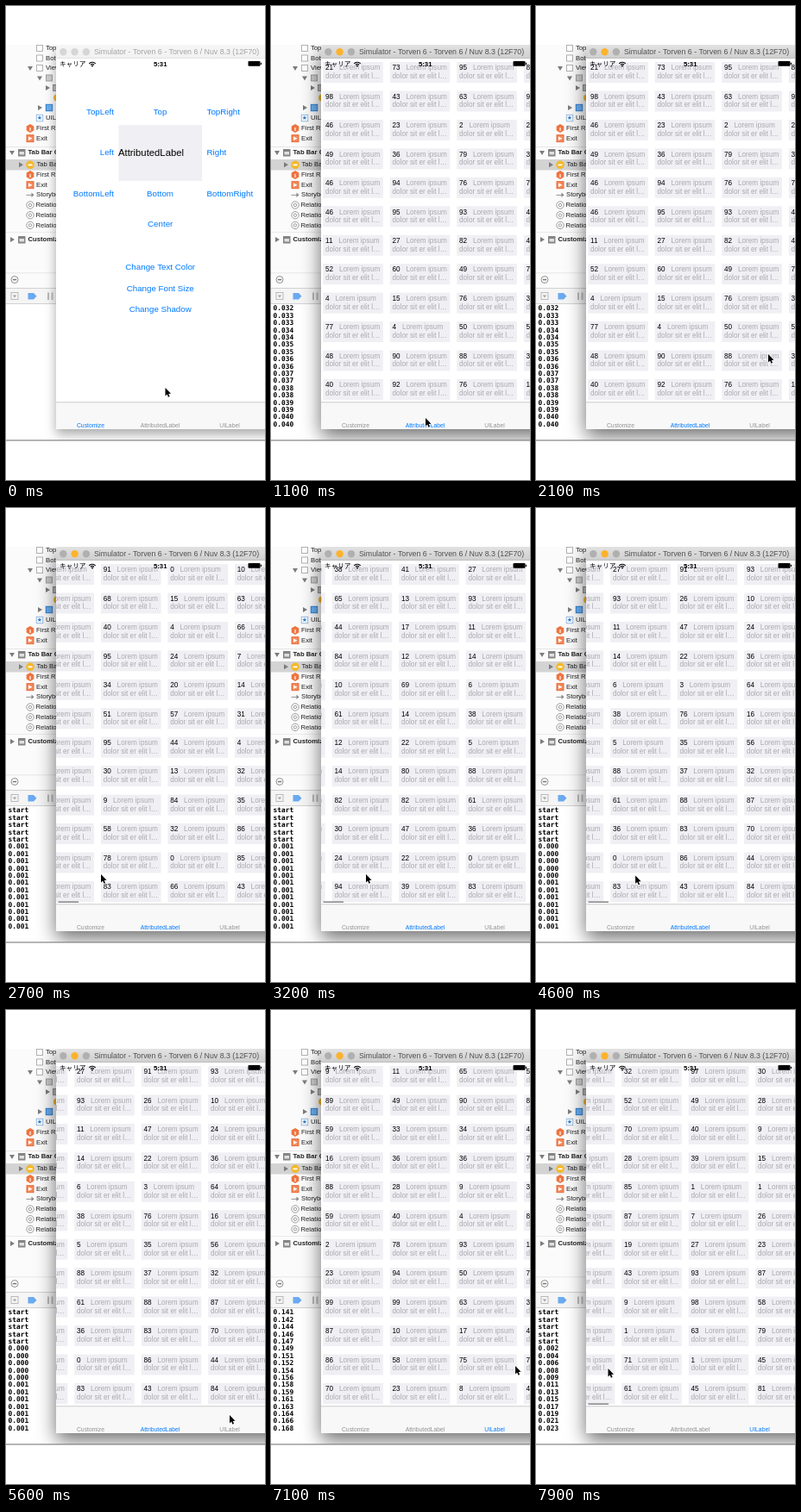
Recreate the animation shown at these times as an HTML page with a canvas. Size 300 by 550 pixels, loop 8000 ms.

```html
<!DOCTYPE html>
<html lang="en">
<head>
<meta charset="utf-8">
<title>Label speed demo</title>
<style>
html, body { margin: 0; width: 100%; height: 100%; overflow: hidden; background: #fff; }
canvas { display: block; width: 300px; height: 550px; }
</style>
</head>
<body>
<canvas id="stage"></canvas>
<script>
const LOOP = 8000, STEP = 100, DECAY = 2.09;
const PITCH = 77.5, ROW = 33.45, ROWS = 12;
const SANS = '"Liberation Sans", Arial, sans-serif';
const MONO = '"DejaVu Sans Mono", monospace';
const CJK = '"Noto Sans CJK JP", "Noto Sans CJK", sans-serif';
const BLUE = '#007aff', CARD = '#efeff4', FAINT = '#a9a9ae';

const canvas = document.getElementById('stage');
const dpr = window.devicePixelRatio || 1;
canvas.width = 300 * dpr;
canvas.height = 550 * dpr;
const g = canvas.getContext('2d');
g.scale(dpr, dpr);
g.textBaseline = 'middle';

const ease = p => p * p * (3 - 2 * p);
const clamp = p => Math.max(0, Math.min(1, p));
const repeat = (n, f) => Array.from({ length: n }, (_, i) => f(i));

function text(s, x, y, size, color, align = 'left', weight = '', family = SANS) {
  g.font = `${weight} ${size}px ${family}`;
  g.textAlign = align;
  g.fillStyle = color;
  g.fillText(s, x, y);
}

function rect(x, y, w, h, color) {
  g.fillStyle = color;
  g.fillRect(x, y, w, h);
}

function round(x, y, w, h, radius, color) {
  g.fillStyle = color;
  g.beginPath();
  g.roundRect(x, y, w, h, radius);
  g.fill();
}

function dot(x, y, r, color) {
  g.fillStyle = color;
  g.beginPath();
  g.arc(x, y, r, 0, Math.PI * 2);
  g.fill();
}

function ring(x, y, r, color) {
  g.strokeStyle = color;
  g.lineWidth = 0.8;
  g.beginPath();
  g.arc(x, y, r, 0, Math.PI * 2);
  g.stroke();
}

function box(x, y, s, color, fill) {
  if (fill) rect(x - s / 2, y - s / 2, s, s, fill);
  g.strokeStyle = color;
  g.lineWidth = 0.9;
  g.strokeRect(x - s / 2, y - s / 2, s, s);
}

function poly(points, color) {
  g.fillStyle = color;
  g.beginPath();
  points.forEach(([x, y]) => g.lineTo(x, y));
  g.closePath();
  g.fill();
}

function hexagon(x, y, r, color) {
  poly(repeat(6, i => {
    const a = (i + 0.5) * Math.PI / 3;
    return [x + r * Math.cos(a), y + r * Math.sin(a)];
  }), color);
}

function twisty(x, y, open) {
  poly(open ? [[x - 3, y - 2], [x + 3, y - 2], [x, y + 3]]
            : [[x - 2, y - 3], [x + 3, y], [x - 2, y + 3]], '#7c7c7c');
}

// Cursor rests and moves: start, end, x, y; a fling speeds up until release
const moves = [
  { from: 0, to: 0, x: 184.5, y: 443 },
  { from: 200, to: 700, x: 179, y: 478 },
  { from: 1100, to: 1900, x: 269, y: 404 },
  { from: 2250, to: 2530, x: 110, y: 425, fling: true },
  { from: 4500, to: 5400, x: 259, y: 470 },
  { from: 6100, to: 6900, x: 283, y: 413 },
  { from: 7250, to: 7550, x: 83.5, y: 416, fling: true }
];

function cursorAt(t) {
  let { x, y } = moves[0];
  for (const m of moves.slice(1)) {
    const p = clamp((t - m.from) / (m.to - m.from));
    const e = m.fling ? p * p : ease(p);
    x += (m.x - x) * e;
    y += (m.y - y) * e;
  }
  return [x, y];
}

// Finger drag followed by an exponential glide
function scrollAt(t, start, end, drag, glide) {
  if (t < end) return drag * clamp((t - start) / (end - start)) ** 2;
  return drag + glide * (1 - Math.exp(-DECAY * (t - end) / 1000));
}

function sidebar() {
  rect(0, 45, 300, 459, '#fbfbfb');
  rect(0, 178, 58, 12.5, '#d3d3d3');
  rect(0, 163, 58, 0.7, '#dedede');
  rect(0, 262, 58, 0.7, '#e6e6e6');
  const label = (s, x, y, weight) => text(s, x, y, 7.7, '#222', 'left', weight);

  ['Top', 'Bott', 'View'].forEach((s, i) => {
    const y = 49 + i * 11.5;
    box(39, y, 7, '#aaa', '#fff');
    label(s, 46, y);
  });
  twisty(28, 72, true);
  twisty(39, 83.5, true);
  box(50, 83.5, 7, '#999', '#ccc');
  twisty(48, 95, false);
  box(58, 95, 7, '#888', '#bbb');
  dot(59, 106.5, 4, '#f5b82a');
  twisty(39, 118, false);
  box(50, 118, 7.5, '#2374c6', '#69aef0');
  box(39, 130, 7.5, '#8db7df', '#fff');
  text('★', 39, 130, 7, '#2f7fd0', 'center', '', '"DejaVu Sans", sans-serif');
  label('UILab', 46, 130);

  [142, 196].forEach(y => {
    hexagon(28, y, 5, '#ef7440');
    rect(27, y - 1, 2, 4, '#f9c7ae');
    label('First Re', 35, y);
    const exit = y + 11.7;
    box(28, exit, 8, '#e8622c', '#f28a5c');
    poly([[26, exit - 2.3], [30.5, exit], [26, exit + 2.3]], '#fff');
    label('Exit', 35, exit);
  });

  [[170, 'Tab Bar C', true], [271, 'Customize', false]].forEach(([y, s, open]) => {
    twisty(7, y, open);
    rect(14, y - 4, 8.5, 8.5, '#858585');
    rect(15.5, y - 1, 5.5, 3.5, '#e0e0e0');
    label(s, 25.5, y, 'bold');
  });
  twisty(17, 184.3, false);
  dot(28, 184.3, 4.8, '#f5b82a');
  rect(25.5, 183.5, 5, 1.8, '#fff');
  label('Tab Bar', 35.5, 184.3);

  rect(23.5, 218.9, 8, 0.9, '#888');
  poly([[29.5, 216.5], [32.5, 219.3], [29.5, 222]], '#888');
  label('Storybo', 35, 219.3);
  repeat(3, i => 231 + i * 11.7).forEach(y => {
    ring(28, y, 4.2, '#888');
    ring(28, y, 1.7, '#888');
    label('Relation', 34.5, y);
  });

  rect(0, 309.5, 58, 0.7, '#ddd');
  ring(10, 317.5, 4, '#777');
  rect(7.8, 316.8, 4.4, 1.5, '#777');
  rect(0, 327, 58, 18.5, '#f5f5f5');
  rect(0, 327, 58, 0.8, '#c8c8c8');
  rect(0, 345, 58, 0.8, '#c8c8c8');
  box(10, 336.5, 8, '#b4b4b4');
  poly([[7.8, 335.5], [12.2, 335.5], [10, 338.5]], '#a5a5a5');
  poly([[25.5, 333], [32, 333], [35.5, 336.7], [32, 340.5], [25.5, 340.5]], '#6aaaf0');
  rect(48, 332.5, 2, 8.5, '#b8b8b8');
  rect(52.5, 332.5, 2, 8.5, '#b8b8b8');
  rect(0, 346, 300, 158, '#fff');
}

const secs = ms => (ms / 1000).toFixed(3);

// A full table load, or the newest column while scrolling
function logLines(tab, offset) {
  if (!tab) return [];
  const fast = tab === 1;
  const last = Math.floor((offset + 239) / PITCH);
  if (last <= 3) {
    return repeat(17, i => secs(fast ? 32 + Math.ceil(i / 2) : Math.floor(141 + 1.71 * i)));
  }
  const zeros = last % 4 ? 0 : 5;
  return repeat(5, () => 'start').concat(
    repeat(ROWS, i => secs(fast ? +(i >= zeros) : Math.round(1.88 * (i + 1)))));
}

function windowFrame(active) {
  g.save();
  g.beginPath();
  g.rect(0, 45, 300, 459);
  g.clip();
  g.shadowColor = active ? 'rgba(0,0,0,.58)' : 'rgba(0,0,0,.34)';
  g.shadowBlur = (active ? 22 : 13) * dpr;
  g.shadowOffsetY = (active ? 8 : 6) * dpr;
  round(58, 45, 270, 446, [4, 0, 0, 0], '#fff');
  g.shadowColor = 'transparent';
  const bar = g.createLinearGradient(0, 45, 0, 61);
  bar.addColorStop(0, active ? '#e2e2e2' : '#f6f6f6');
  bar.addColorStop(1, active ? '#cecece' : '#f1f1f1');
  round(58, 45, 270, 16, [4, 0, 0, 0], bar);
  rect(58, 60.4, 242, 0.6, active ? '#b5b5b5' : '#dcdcdc');
  repeat(3, i => dot(66.3 + i * 13.3, 53.2, 4.2, !active ? '#d6d6d6' : i === 1 ? '#fdb32c' : '#b0b0b0'));
  text('Simulator - Torven 6 - Torven 6 / Nuv 8.3 (12F70)', 102, 53.4, 8.8, active ? '#505050' : '#a4a4a4');
  g.restore();
}

function customize() {
  const link = (s, x, y, align) => text(s, x, y, 9.75, BLUE, align);
  rect(130.5, 138, 96.5, 65, CARD);
  text('AttributedLabel', 130, 171, 11.3, '#000');
  ['Top', '', 'Bottom'].forEach((s, i) => {
    const y = 123.5 + i * 47.3;
    link(s + 'Left', 125, y, 'right');
    if (s) link(s, 178.5, y, 'center');
    link(s + 'Right', 232.5, y, 'left');
  });
  link('Center', 178.7, 253, 'center');
  ['Text Color', 'Font Size', 'Shadow'].forEach((s, i) =>
    link('Change ' + s, 178.7, 303.3 + i * 24.6, 'center'));
}

function cellNumber(tab, col, row) {
  const v = Math.sin(tab * 37.719 + col * 12.9898 + row * 78.233) * 43758.5453;
  return Math.floor((v - Math.floor(v)) * 100);
}

function tableView(tab, offset) {
  const first = Math.max(0, Math.floor(offset / PITCH));
  for (let col = first; col < first + 5; col++) {
    const x = 63 + col * PITCH - offset;
    for (let row = 0; row < ROWS; row++) {
      const y = 72 + row * ROW;
      const lead = cellNumber(tab, col, row) + '   ';
      rect(x - 2.7, y - 7, 69.5, 24, CARD);
      text(lead, x, y, 8.2, '#000');
      text('Lorem ipsum', x + g.measureText(lead).width, y, 8.2, FAINT);
      text('dolor sit er elit l…', x, y + 9.7, 8.2, FAINT);
    }
  }
}

function statusBar() {
  text('キャリア', 62, 67.2, 7.6, '#000', 'left', '', CJK);
  g.strokeStyle = '#000';
  g.lineWidth = 1.1;
  [2.6, 4.8].forEach(r => {
    g.beginPath();
    g.arc(100, 70, r, -Math.PI * 0.78, -Math.PI * 0.22);
    g.stroke();
  });
  dot(100, 69.4, 1, '#000');
  text('5:31', 178.7, 67.5, 7.8, '#000', 'center', 'bold');
  round(280.5, 64, 14, 5.8, 1, '#000');
  rect(295, 65.8, 1, 2.2, '#000');
}

function tabBar(tab) {
  rect(58, 459.5, 242, 31.5, '#f8f8f8');
  rect(58, 459.5, 242, 0.7, '#b8b8b8');
  ['Customize', 'AttributedLabel', 'UILabel'].forEach((s, i) =>
    text(s, 98 + i * 80.5, 487.3, 6.8, i === tab ? BLUE : '#929292', 'center'));
}

function pointer(x, y) {
  const shape = [[0, 0], [0, 9.4], [2.1, 7.5], [3.5, 10.8], [5.1, 10.1], [3.7, 6.9], [6.5, 6.7]];
  g.save();
  g.translate(x, y);
  poly(shape, '#000');
  g.strokeStyle = '#fff';
  g.lineWidth = 1.5;
  g.stroke();
  poly(shape, '#000');
  g.restore();
}

function draw(t) {
  const tab = t < 1000 ? 0 : t < 6000 ? 1 : 2;
  const offset = tab === 1 ? scrollAt(t, 2250, 2530, 159, 598)
    : tab === 2 ? scrollAt(t, 7250, 7550, 199, 587) : 0;
  rect(0, 0, 300, 550, '#fff');
  sidebar();
  logLines(tab, offset).forEach((s, i) =>
    text(s, 2.5, 351.4 + i * 8.39, 7.9, '#000', 'left', 'bold', MONO));
  windowFrame(t >= 700);

  g.save();
  g.beginPath();
  g.rect(58, 61, 242, 430);
  g.clip();
  if (tab) tableView(tab, offset);
  else customize();
  if (offset > 0) {
    g.globalAlpha = tab === 1 ? clamp((5300 - t) / 300) : 1;
    rect(60.5, 456.4, 23.5, 1.6, '#8c8c8f');
    g.globalAlpha = 1;
  }
  statusBar();
  tabBar(tab);
  g.restore();

  rect(0, 503.5, 300, 1, '#6c6c6c');
  pointer(...cursorAt(t));
}

const began = performance.now();
function tick() {
  const t = (performance.now() - began) % LOOP;
  draw(Math.floor(t / STEP) * STEP);
  requestAnimationFrame(tick);
}
tick();
</script>
</body>
</html>
```
